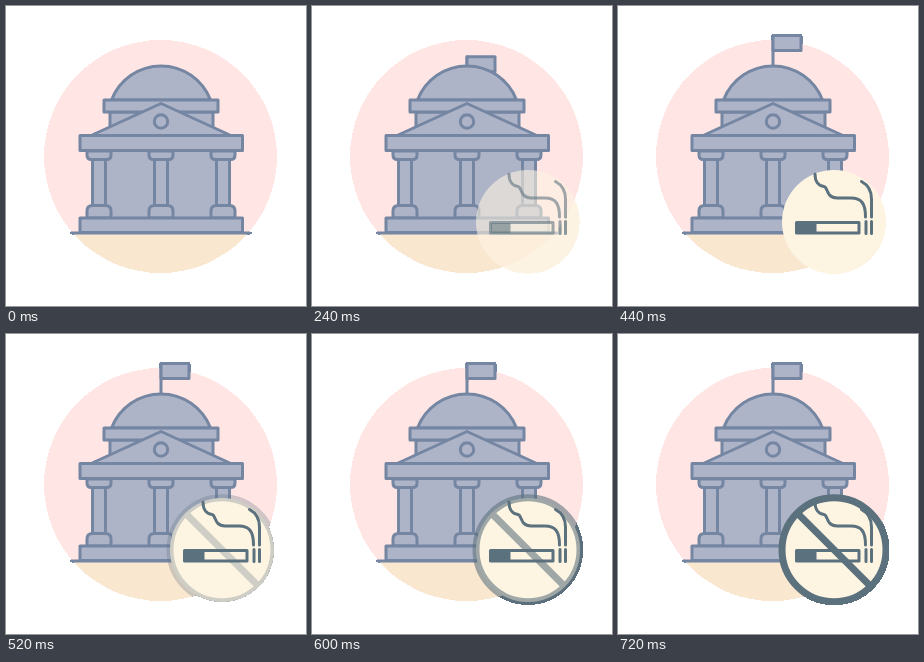
Recreate the animation shown at these times as an HTML page with a canvas. Size 300 px wide and 300 px high, loop 2000 ms.

```html
<!DOCTYPE html>
<html lang="en">
<head>
<meta charset="utf-8">
<title>No smoking in public buildings</title>
<style>
html, body { margin: 0; width: 100%; height: 100%; overflow: hidden; background: #fff; }
canvas { display: block; }
</style>
</head>
<body>
<canvas id="stage" width="300" height="300"></canvas>
<script>
const LOOP = 2000, STEP = 40;
const PINK = '#ffe6e4', SAND = '#fae7d0', STONE = '#aeb4c8', EDGE = '#7586a3';
const CREAM = '#fdf4e2', DARK = '#5b717d';
const ctx = document.getElementById('stage').getContext('2d', { willReadFrequently: true });

const progress = (t, from, to) => Math.min(1, Math.max(0, (t - from) / (to - from)));

function paint(d, fill, stroke, width = 3) {
  const path = new Path2D(d);
  ctx.lineWidth = width;
  if (fill) { ctx.fillStyle = fill; ctx.fill(path); }
  if (stroke) { ctx.strokeStyle = stroke; ctx.stroke(path); }
}
const stone = d => paint(d, STONE, EDGE);
const box = (x, y, w, h) => `M${x} ${y}h${w}v${h}h${-w}z`;
const disc = (x, y, r) => `M${x - r} ${y}a${r} ${r} 0 1 1 ${2 * r} 0a${r} ${r} 0 1 1 ${-2 * r} 0z`;

function backdrop() {
  ctx.save();
  ctx.clip(new Path2D(disc(154.5, 150.5, 116.5)));
  paint(box(0, 0, 300, 227), PINK);
  paint(box(0, 227, 300, 73), SAND);
  ctx.restore();
}

function flag(drop) {
  ctx.save();
  ctx.translate(0, drop);
  paint('M155 29.5V64', null, EDGE);
  stone(box(155, 29.5, 28, 15));
  ctx.restore();
}

function building() {
  stone('M105.5 94A53 53 0 0 1 204.5 94z');
  stone(box(104, 106, 103, 24));
  stone(box(98, 94, 114, 12));
  stone('M155 97.5L226 130H84z');
  stone(disc(155, 115.5, 6.7));
  paint(box(87, 144, 136, 68), STONE);
  for (const x of [93, 155, 217]) {
    stone(box(x - 6.5, 152, 13, 48));
    stone(`M${x - 12} 145h24v4q0 4.5 -4.5 4.5h-15q-4.5 0 -4.5 -4.5z`);
    stone(`M${x - 12} 212v-7q0 -5.5 5.5 -5.5h13q5.5 0 5.5 5.5v7z`);
  }
  stone(box(74, 129.5, 162.5, 15));
  stone(box(74, 212, 162.5, 14.5));
  paint('M65.5 227H244.5', null, EDGE);
}

function cigarette(alpha) {
  ctx.globalAlpha = alpha;
  paint(disc(216, 216, 52), CREAM);
  paint(box(178.5, 216.5, 62.5, 10.5), CREAM, DARK);
  paint(box(179, 217, 19.5, 10), DARK);
  paint('M248 215.5V227.5M253.5 215.5V227.5', null, DARK);
  paint('M197 168C197 176 201 180 206 180.5C210 181 208 192 219 192H233C243 192 247.5 197 247.5 211', null, DARK);
  paint('M243.5 175.5C250 179 253.5 185 253.5 193V211', null, DARK);
}

function ban(alpha) {
  ctx.globalAlpha = alpha;
  paint(disc(216, 215.7, 52) + 'M179.2 179L252.8 252.4', null, DARK, 7);
}

// One-bit transparency: each pixel is either fully shown or fully hidden.
function hardenAlpha() {
  const image = ctx.getImageData(0, 0, 300, 300), px = image.data;
  for (let i = 3; i < px.length; i += 4) px[i] = px[i] < 128 ? 0 : 255;
  ctx.putImageData(image, 0, 0);
}

function draw(t) {
  const rise = progress(t, 0, 410), sign = progress(t, 440, 720);
  ctx.globalAlpha = 1;
  ctx.clearRect(0, 0, 300, 300);
  ctx.lineCap = ctx.lineJoin = 'round';
  backdrop();
  flag(51 * (1 - rise));
  building();
  if (rise) cigarette(rise);
  if (sign) ban(sign);
  hardenAlpha();
}

const start = performance.now();
function tick() {
  const t = (performance.now() - start) % LOOP;
  draw(Math.floor(t / STEP) * STEP);
  requestAnimationFrame(tick);
}
tick();
</script>
</body>
</html>
```
